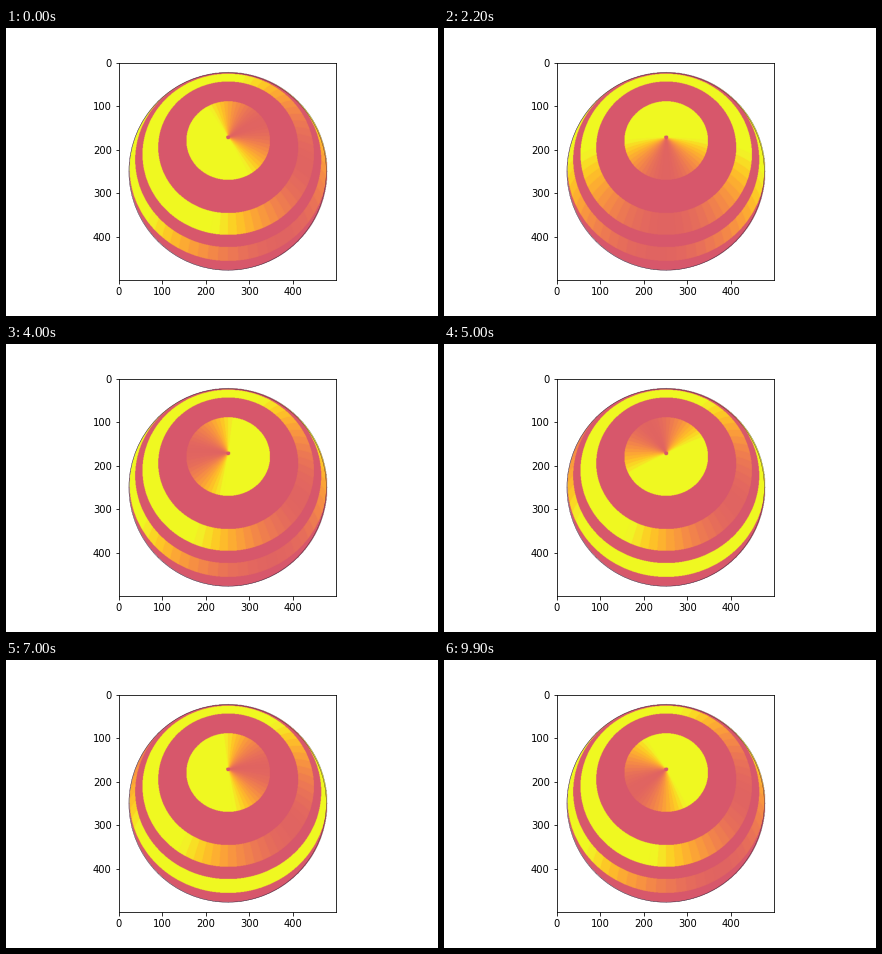
Recreate the animation shown at these times as a matplotlib script. Size 432 px wide and 288 px high, loop 10 s.

```python
import numpy as np
import matplotlib.pyplot as plt
from matplotlib.animation import FuncAnimation
from matplotlib.patches import Circle

FRAMES = 100
SIZE, CENTER, RADIUS = 500, 250, 227
TILT = np.radians(20)
CELL = np.radians(6)
BASE = 5 / 9
DEPTH = 0.4

# colatitude range, longitude of the minimum at the start, turns per run
BANDS = [
    (1.2, 25, 30, 1.5),
    (45, 60, -10, 10),
    (70, 85, -55, 5),
]

# orthographic view of a sphere with its pole tipped towards the viewer
rows, cols = np.indices((SIZE, SIZE))
x = (cols - CENTER) / RADIUS
y = (CENTER - rows) / RADIUS
inside = x**2 + y**2 <= 1
z = np.sqrt(np.clip(1 - x**2 - y**2, 0, None))
height = y * np.sin(TILT) + z * np.cos(TILT)
colat = np.degrees(np.arccos(np.clip(height, -1, 1)))
lon = np.arctan2(y * np.cos(TILT) - z * np.sin(TILT), x)
lon = (np.floor(lon / CELL) + 0.5) * CELL

masks = [inside & (colat >= lo) & (colat < hi) for lo, hi, _, _ in BANDS]
plasma = plt.get_cmap("plasma")


def sphere(frame):
    heat = np.full((SIZE, SIZE), BASE)
    for mask, (_, _, start, turns) in zip(masks, BANDS):
        low = np.radians(start) - 2 * np.pi * turns * frame / (FRAMES - 1)
        heat[mask] = np.minimum(1, 1 - DEPTH * np.cos(lon[mask] - low))
    rgba = plasma(heat, bytes=True)
    rgba[~inside] = 0
    return rgba


fig, ax = plt.subplots(figsize=(6, 4), dpi=72)
fig.subplots_adjust(left=0.125, right=0.9, bottom=0.125, top=0.88)
image = ax.imshow(sphere(0))
ax.add_patch(Circle((CENTER, CENTER), RADIUS, fill=False, ec="#4a2040", lw=0.4))
ax.set_xticks(range(0, 500, 100))
ax.set_yticks(range(0, 500, 100))


def update(frame):
    image.set_data(sphere(frame))
    return [image]


anim = FuncAnimation(fig, update, frames=FRAMES, interval=100, repeat=True)
plt.show()
```
